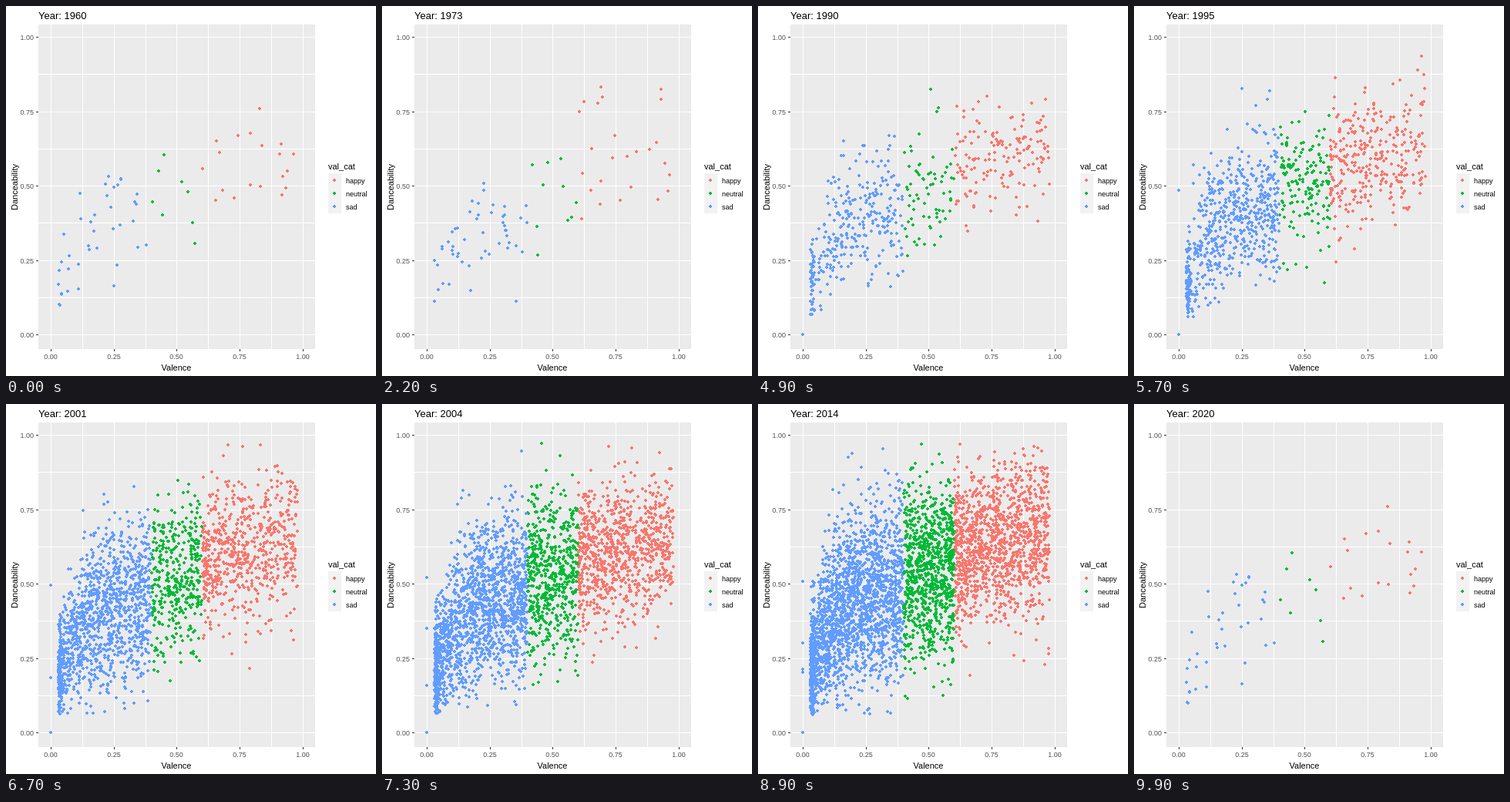
An HTML page with a canvas that plays this animation: 480 by 480 pixels, repeating every 10000 ms.

```html
<!DOCTYPE html>
<html lang="en">
<head>
<meta charset="utf-8">
<title>Valence and danceability by year</title>
<style>
  html, body { margin: 0; width: 100%; height: 100%; overflow: hidden; background: #fff; }
  svg, canvas { position: absolute; left: 0; top: 0; width: 480px; height: 480px; }
  text { font-family: Arial, "Liberation Sans", sans-serif; font-size: 11px; }
  .tick { font-size: 9px; fill: #4d4d4d; }
  .key { font-size: 9px; }
  .title { font-size: 13px; }
</style>
</head>
<body>
<svg id="chart" viewBox="0 0 480 480" shape-rendering="crispEdges"></svg>
<canvas id="dots" width="480" height="480"></canvas>
<script>
const STEP = 100, FRAMES = 100, LAST = FRAMES - 1;

// Data space to whole pixels, halves rounded down
const snap = v => Math.ceil(v - 0.5);
const px = v => 58 + snap(v * 327);
const py = v => 426 - snap(v * 386);

// Growth from 0 to 1 over the decades
const growth = frame => 1 / (1 + Math.exp((67 - frame) / 8.5));

// How quickly the sad cloud rises from its left edge
const rise = x => 1 - Math.exp(-x / 0.08);

// Each group: its share of all points, where x falls, and the mean and spread of y at growth g
const GROUPS = {
  happy: {
    color: '#F8766D',
    share: g => 0.29,
    x: r => 0.602 + 0.378 * r() ** 1.2,
    mean: (x, g) => 0.58 + 0.055 * g + 0.15 * (x - 0.76),
    spread: (x, g) => 0.1 + 0.035 * g
  },
  neutral: {
    color: '#00BA38',
    share: g => 0.12 + 0.1 * g,
    x: r => 0.4 + 0.2 * r(),
    mean: (x, g) => 0.49 + 0.06 * g,
    spread: (x, g) => 0.11 + 0.045 * g
  },
  sad: {
    color: '#619CFF',
    share: g => 0.59 - 0.1 * g,
    x: r => r() < 0.1 ? 0.03 + 0.013 * r() : 0.035 + 0.363 * r(),
    mean: (x, g) => 0.42 * rise(x) - 0.01 + 0.07 * g,
    spread: (x, g) => (0.08 + 0.08 * rise(x)) * (0.7 + 0.3 * g)
  }
};
const groups = Object.values(GROUPS);

// Static chart
const chart = document.getElementById('chart');
function add(tag, attrs, text) {
  const el = document.createElementNS('http://www.w3.org/2000/svg', tag);
  for (const k in attrs) el.setAttribute(k, attrs[k]);
  if (text) el.textContent = text;
  return chart.appendChild(el);
}
const rect = (x, y, width, height, fill) => add('rect', { x, y, width, height, fill });
const label = (x, y, text, cls = '', anchor = 'start') =>
  add('text', { x, y, class: cls, 'text-anchor': anchor }, text);

rect(42, 24, 359, 421, '#EBEBEB');
for (let i = 0; i < 8; i++) {
  rect(px(i / 8), 24, 1, 421, '#fff');
  rect(42, py(i / 8), 359, 1, '#fff');
}
rect(px(1), 24, 1, 421, '#fff');
rect(42, py(1), 359, 1, '#fff');
for (let v = 0; v <= 1; v += 0.25) {
  rect(px(v), 445, 1, 3, '#333');
  rect(39, py(v), 3, 1, '#333');
  label(px(v), 458, v.toFixed(2), 'tick', 'middle');
  label(36, py(v) + 4, v.toFixed(2), 'tick', 'end');
}
label(221, 473, 'Valence', '', 'middle');
add('text', { transform: 'translate(15 235) rotate(-90)', 'text-anchor': 'middle' }, 'Danceability');
label(418, 212, 'val_cat');
rect(418, 217, 17, 52, '#F2F2F2');
Object.keys(GROUPS).forEach((name, i) => label(441, 230 + 17 * i, name, 'key'));
const title = label(42, 17, 'Year: 1960', 'title');

// Moving points
const ctx = document.getElementById('dots').getContext('2d');
function dot(x, y) {
  ctx.fillRect(x - 2, y - 1, 4, 2);
  ctx.fillRect(x - 1, y - 2, 2, 4);
}

function random(seed) {
  let a = Math.imul(seed + 11, 0x9E3779B1);
  return () => {
    a = a + 0x6D2B79F5 | 0;
    let t = Math.imul(a ^ a >>> 15, 1 | a);
    t = t + Math.imul(t ^ t >>> 7, 61 | t) ^ t;
    return ((t ^ t >>> 14) >>> 0) / 4294967296;
  };
}

const normal = r => Math.sqrt(-2 * Math.log(1 - r())) * Math.cos(2 * Math.PI * r());

function cloud(group, g, r) {
  const count = Math.round((64 + 4400 * g) * group.share(g));
  ctx.fillStyle = group.color;
  for (let i = 0; i < count; i++) {
    const x = group.x(r);
    let y;
    do y = group.mean(x, g) + group.spread(x, g) * normal(r);
    while (y < 0.06 || y > 0.975);
    dot(px(x), py(y));
  }
}

function draw(frame) {
  title.textContent = 'Year: ' + (1960 + Math.round(frame * 60 / LAST));
  ctx.clearRect(0, 0, 480, 480);
  // The last step shows the first cloud again
  const step = frame % LAST;
  const g = growth(step), r = random(step);
  for (const group of groups) cloud(group, g, r);
  // Tracks without any valence
  if (g > 0.03) dot(px(0), py(0));
  for (let i = 0; i < Math.round(4 * g); i++) dot(px(0), py(0.1 + 0.56 * r()));
  groups.forEach((group, i) => {
    ctx.fillStyle = group.color;
    dot(426, 226 + 17 * i);
  });
}

const start = performance.now();
let shown = -1;
function tick() {
  const frame = Math.floor((performance.now() - start) / STEP) % FRAMES;
  if (frame !== shown) draw(shown = frame);
  requestAnimationFrame(tick);
}
tick();
</script>
</body>
</html>
```
